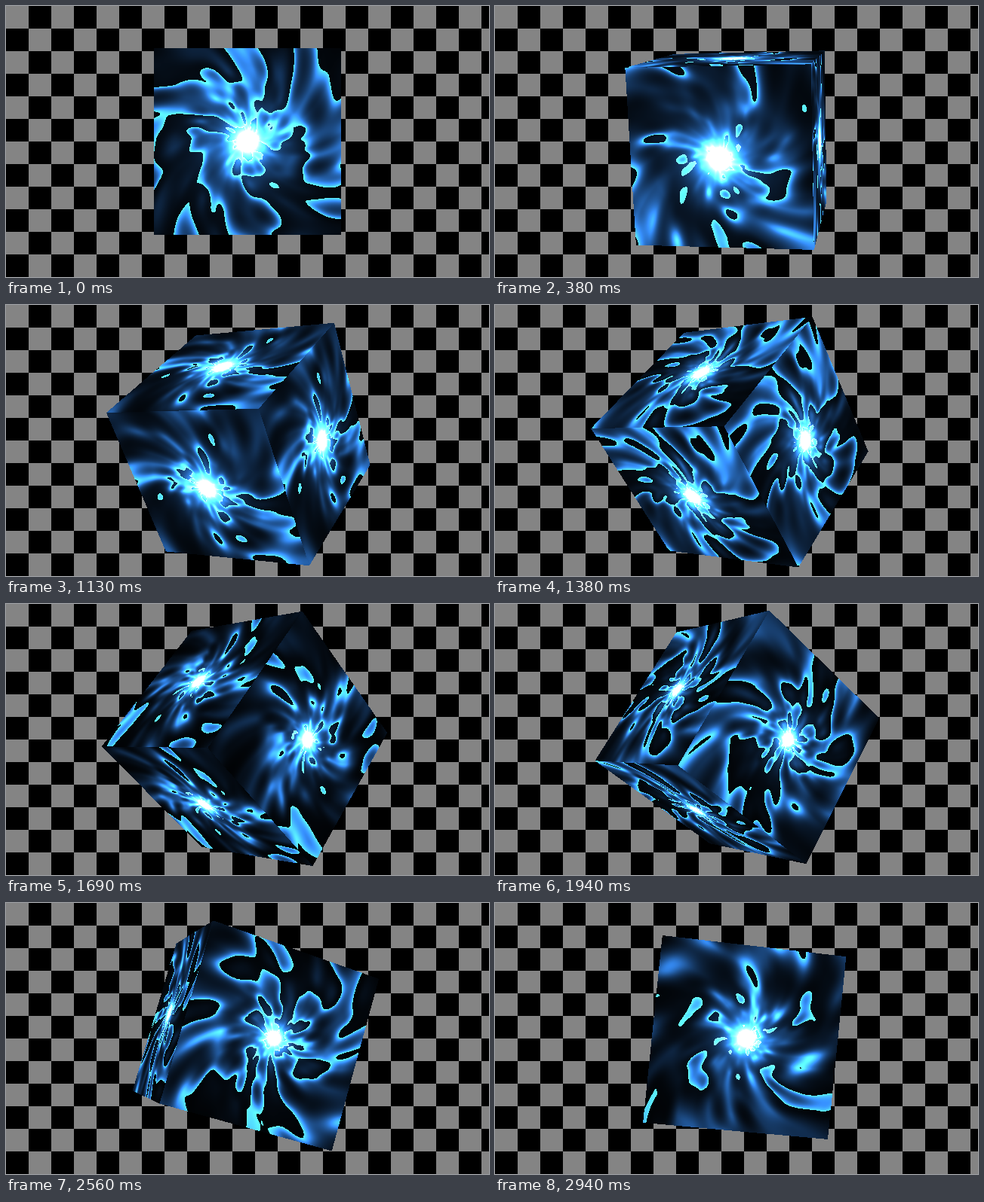
An HTML page with a canvas that plays this animation: 640 by 360 pixels, repeating every 3 s.

```html
<!DOCTYPE html>
<html lang="en">
<head>
<meta charset="utf-8">
<title>Plasma cube</title>
<style>
  html, body { margin: 0; width: 100%; height: 100%; overflow: hidden; background: #000; }
  canvas { display: block; width: 640px; height: 360px; }
</style>
</head>
<body>
<canvas id="stage" width="640" height="360"></canvas>
<script>
const W = 640, H = 360, LOOP = 3000, STEP = 62.5;
const HALF = 110, CAMERA = 1000, TILE = 30, GREY = 132;
const ctx = document.getElementById('stage').getContext('2d');
const image = ctx.createImageData(W, H);
const pixels = image.data;

// Seeded lattice for the value noise
let seed = 7;
const lattice = Float32Array.from({ length: 4096 }, () => {
  seed = (Math.imul(seed, 1664525) + 1013904223) >>> 0;
  return seed / 4294967296;
});

const smooth = f => f * f * (3 - 2 * f);
const mix = (a, b, f) => a + (b - a) * f;

// Noise around the circle (turn, 0..1) and outwards (depth)
function noise(turn, depth, cells) {
  const x = (turn - Math.floor(turn)) * cells;
  const x0 = Math.floor(x) % cells, x1 = (x0 + 1) % cells;
  const y0 = Math.floor(depth);
  const fx = smooth(x - Math.floor(x)), fy = smooth(depth - y0);
  const row0 = (y0 & 63) * 64, row1 = ((y0 + 1) & 63) * 64;
  return mix(mix(lattice[row0 + x0], lattice[row0 + x1], fx),
             mix(lattice[row1 + x0], lattice[row1 + x1], fx), fy);
}

// Light of the swirling plasma at a point of a face
function plasma(u, v, time, glow) {
  const r = Math.hypot(u, v) + 0.01;
  const turn = (Math.atan2(v, u) - r * 0.005) / (2 * Math.PI);
  const depth = Math.log(r + 6) * 2.2 - time * 1.6;
  const n = noise(turn, depth + 20, 18) * 0.66 + noise(turn + 0.37, depth * 1.5 + 30, 37) * 0.34;
  const wave = (n - 0.5) * 1.9 + time * 1.5;
  const saw = wave - Math.floor(wave);
  const s2 = saw * saw, s4 = s2 * s2;
  return (0.6 * s2 + 1.1 * s4 * s4) * (0.8 + 25 / (r + 4)) + (glow / r) ** 2;
}

function paint(time) {
  const angle = time * 0.5, c = Math.cos(angle), s = Math.sin(angle);
  const glow = 23 + 7 * Math.sin(1.85 * time + 0.65);
  // Camera position in cube space
  const ox = CAMERA * s, oy = CAMERA * c * s, oz = CAMERA * c * c;

  for (let py = 0, i = 0; py < H; py++) {
    const Y = H / 2 - py - 0.5;
    for (let px = 0; px < W; px++, i += 4) {
      const X = px + 0.5 - W / 2;
      const tilt = -X * s - CAMERA * c;
      const dx = X * c - CAMERA * s;
      const dy = Y * c + tilt * s;
      const dz = -Y * s + tilt * c;

      const ax = -ox / dx, ay = -oy / dy, az = -oz / dz;
      const hx = HALF / Math.abs(dx), hy = HALF / Math.abs(dy), hz = HALF / Math.abs(dz);
      const nx = ax - hx, ny = ay - hy, nz = az - hz;
      const near = Math.max(nx, ny, nz);
      const far = Math.min(ax + hx, ay + hy, az + hz);

      if (near < far) {
        const x = ox + near * dx, y = oy + near * dy, z = oz + near * dz;
        const light = near === nz ? plasma(x, y, time, glow)
                    : near === nx ? plasma(-z, y, time, glow)
                    : plasma(x, -z, time, glow);
        pixels[i] = 54 * light;
        pixels[i + 1] = 142 * light;
        pixels[i + 2] = 250 * light;
      } else {
        const odd = (Math.floor(px / TILE) + Math.floor(py / TILE)) & 1;
        pixels[i] = pixels[i + 1] = pixels[i + 2] = odd ? 0 : GREY;
      }
      pixels[i + 3] = 255;
    }
  }
  ctx.putImageData(image, 0, 0);
}

let shown = -1;
const start = performance.now();

// Sixteen poses a second, switched on whole hundredths
function tick() {
  const ms = Math.floor(((performance.now() - start) % LOOP) / 10) * 10;
  const pose = Math.ceil((ms + 5) / STEP) - 1;
  if (pose !== shown) {
    shown = pose;
    paint(pose * STEP / 1000);
  }
  requestAnimationFrame(tick);
}
tick();
</script>
</body>
</html>
```
